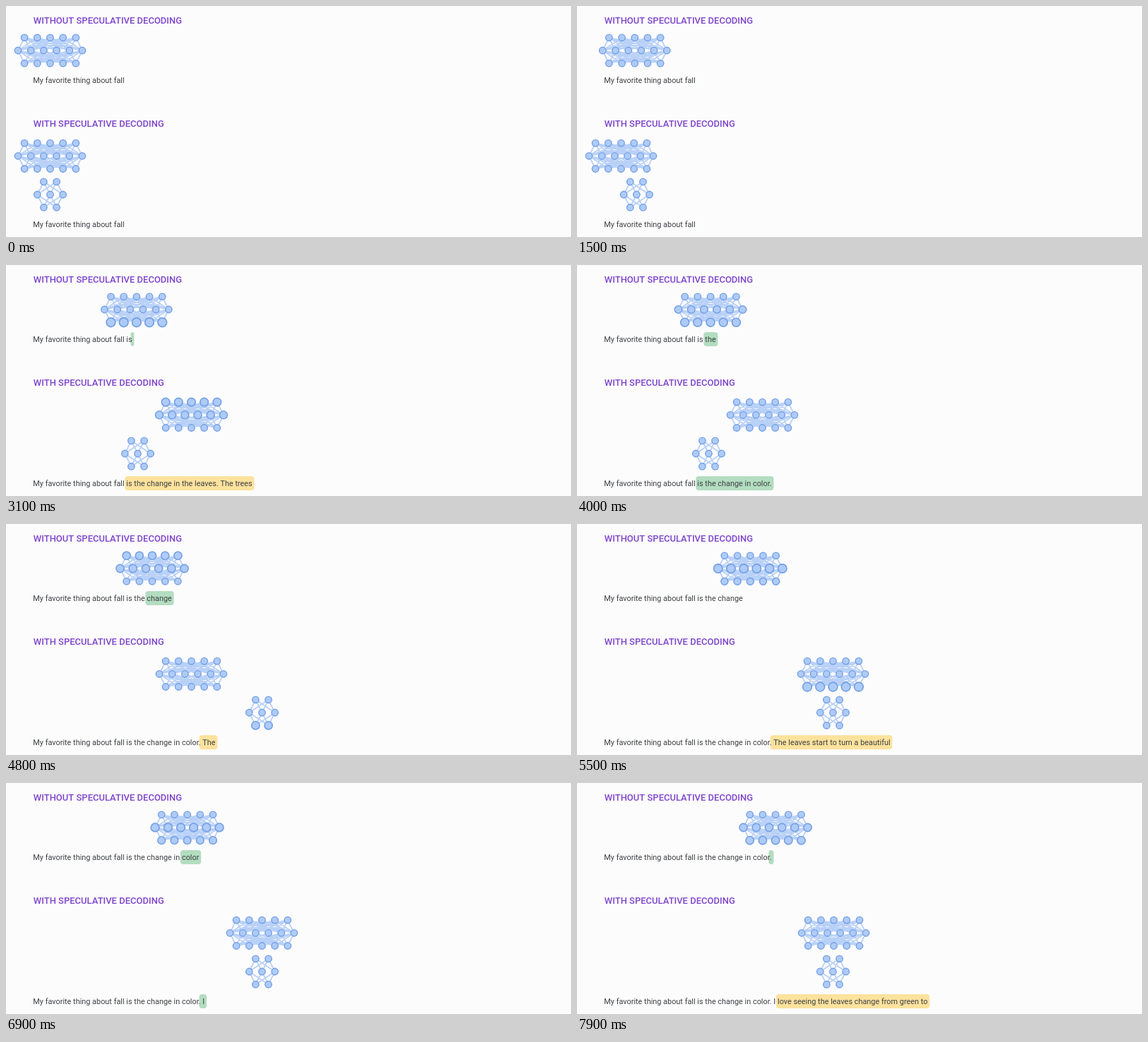
These frames come from a looping animation (800 by 327 pixels, 8000 ms). An HTML page with a canvas:

```html
<!DOCTYPE html>
<html lang="en">
<head>
<meta charset="utf-8">
<title>Speculative decoding</title>
<style>
html, body { margin: 0; width: 100%; height: 100%; overflow: hidden; background: #fdfcfd; }
canvas { display: block; }
</style>
</head>
<body>
<canvas id="stage" width="800" height="327"></canvas>
<script>
const ctx = document.getElementById('stage').getContext('2d');
const LOOP = 8000, LEFT = 38.3, GAP = 18.2, ROW = 18.2;
const GREEN = '#b3ddc0', YELLOW = '#fde29d';
const BODY = '400 10.9px Roboto, sans-serif', TITLE = '500 13px Roboto, sans-serif';
const PROMPT = 'My favorite thing about fall';
const ACCEPTED = PROMPT + ' is the change in color.';

const clamp = v => Math.max(0, Math.min(1, v));
const ease = v => (v = clamp(v)) < .5 ? 2 * v * v : 1 - 2 * (1 - v) ** 2;
const bump = d => Math.abs(d) < 170 ? Math.cos(Math.PI * d / 340) ** 2 : 0;

function endOf(text) {
  ctx.font = BODY;
  return LEFT + ctx.measureText(text).width;
}

// Position along a list of moves: [start, duration, destination]
function travel(t, x, moves) {
  for (const [start, span, to] of moves) x += (to - x) * ease((t - start) / span);
  return x;
}

// Text steps: words appear one by one on a marker that wipes away from the left
const STEP = 980, FIRST = 2700;
const tokens = ['is', 'the', 'change', 'in', 'color', '.'];
const upperSteps = [], upperMoves = [[1400, 350, 0]];
let kept = PROMPT + ' ';
tokens.forEach((word, i) => {
  const at = FIRST + STEP * i;
  upperSteps.push({ at, kept, words: [word], gap: 1, color: GREEN, wipe: at + 350 });
  upperMoves[i][2] = endOf(kept) + 7.7;
  upperMoves.push([at + 350, 90, 0]);
  kept += word + (word === 'color' ? '' : ' ');
});
upperMoves.pop();

const draft = (at, gap, kept, words) =>
  ({ at, gap, kept, words: words.split('|'), color: YELLOW, wipe: Infinity });
const accept = (at, wipe, kept, word) =>
  ({ at, gap: 1, kept, words: [word], color: GREEN, wipe });
const lowerSteps = [
  draft(1950, 40, PROMPT + ' ', 'is| the| change| in| the| leaves|.| The| trees'),
  accept(3500, 4250, PROMPT + ' ', 'is the change in color.'),
  draft(4780, 50, ACCEPTED, ' The| leaves| start| to| turn| a| beautiful'),
  accept(6300, 6960, ACCEPTED, ' I'),
  draft(7350, 60, ACCEPTED + ' I ', 'love| seeing| the| leaves| change| from| green| to')
];
const largeMoves = [[2350, 350, 262.5], [5100, 350, 362.5], [7875, 350, 462.5]];
const smallMoves = [[1400, 340, 186.5], [4250, 350, 362.5]];

// A wave that climbs to the top row and comes back down
const bounce = (t, peaks) => [0, 1, 2].map(row => Math.max(...peaks.map((p, i) =>
  Math.max(bump(t - p - 160 * row), p > 1800 ? bump(t - p + 160 * row) : 0))));
const upperPeaks = Array.from({ length: 7 }, (_, i) => 1780 + STEP * i);
const largePeaks = [3030, 5840];
const smallPeaks = [1950, 4780, 7350];

function network(x, y, counts, pulse) {
  const rows = counts.map((n, r) => Array.from({ length: n }, (_, i) =>
    [x + (i - (n - 1) / 2) * GAP, y + r * ROW]));
  ctx.strokeStyle = '#b9d1f7';
  ctx.lineWidth = 1.8;
  ctx.beginPath();
  for (const r of [0, 2])
    for (const a of rows[r])
      for (const b of rows[1]) {
        ctx.moveTo(...a);
        ctx.lineTo(...b);
      }
  ctx.stroke();
  ctx.fillStyle = '#aecbf8';
  ctx.strokeStyle = '#739fe3';
  rows.forEach((row, r) => {
    ctx.lineWidth = 1.4 + .3 * pulse[r];
    for (const [cx, cy] of row) {
      ctx.beginPath();
      ctx.arc(cx, cy, 4.7 + 1.7 * pulse[r], 0, 7);
      ctx.fill();
      ctx.stroke();
    }
  });
}

function label(text, y, font, color) {
  ctx.font = font;
  ctx.fillStyle = color;
  ctx.fillText(text, LEFT + (font === TITLE ? .5 : 0), y);
}

function sentence(t, y, steps) {
  const step = steps.filter(s => s.at <= t).pop();
  let text = PROMPT;
  if (step) {
    const count = Math.floor((t - step.at) / step.gap) + 1;
    text = step.kept + step.words.slice(0, count).join('');
    const from = endOf(step.kept) - 2, to = endOf(text) + 2.8;
    const wiped = ease((t - step.wipe) / 90), width = (to - from) * (1 - wiped);
    if (width > 0) {
      ctx.fillStyle = step.color;
      ctx.beginPath();
      ctx.roundRect(to - width, y - 13.7, width, 20, Math.min(4, width / 2));
      ctx.fill();
    }
  }
  label(text, y, BODY, '#3c4043');
}

function draw(t) {
  ctx.fillStyle = '#fdfcfd';
  ctx.fillRect(0, 0, 800, 327);
  label('WITHOUT SPECULATIVE DECODING', 24.8, TITLE, '#7d45cb');
  label('WITH SPECULATIVE DECODING', 170.7, TITLE, '#7d45cb');
  network(travel(t, 62.5, upperMoves), 44.8, [5, 6, 5], bounce(t, upperPeaks));
  network(travel(t, 62.5, largeMoves), 194.1, [5, 6, 5], bounce(t, largePeaks));
  network(travel(t, 62.5, smallMoves), 248.8, [2, 3, 2], [0, 1, 2].map(row =>
    .6 * Math.max(...smallPeaks.map(p => bump((t - p + 100 * (2 - row)) * 1.6)))));
  sentence(t, 108.7, upperSteps);
  sentence(t, 312.7, lowerSteps);
}

const begun = performance.now();
function tick() {
  draw((performance.now() - begun) % LOOP);
  requestAnimationFrame(tick);
}
tick();
</script>
</body>
</html>
```
